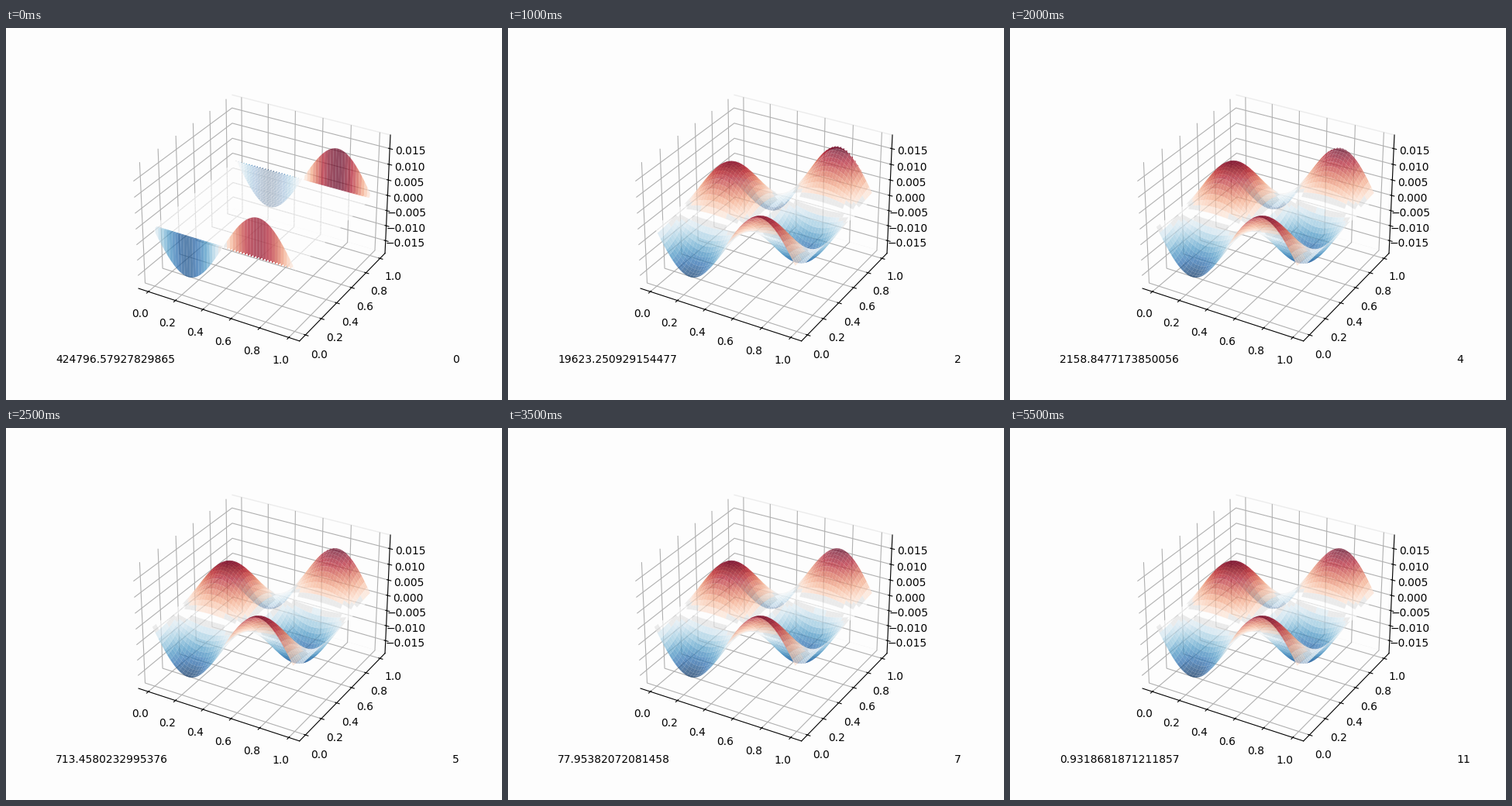
These frames come from a looping animation (640x480 px, 6000 ms). A matplotlib script:

```python
import numpy as np
import matplotlib.pyplot as plt
from matplotlib.animation import FuncAnimation
from matplotlib.colors import ListedColormap

plt.rcParams["axes3d.automargin"] = True

PAPER = "#fdfdfd"
STEPS = 12
INTERVAL = 500
AMPLITUDE = 1 / (8 * np.pi**2)
Z_LIMIT = 0.0185

axis = np.linspace(0, 1, 1025)
X, Y = np.meshgrid(axis, axis)
WAVE = -AMPLITUDE * np.sin(2 * np.pi * X)


def make_cmap():
    """Red-blue map whose middle fades into the paper colour."""
    colors = plt.get_cmap("RdBu_r")(np.linspace(0, 1, 256))
    offset = np.abs(np.linspace(-0.5, 0.5, 256))
    colors[offset < 0.065, :3] = 0.89
    colors[offset < 0.03, :3] = 0.992
    return ListedColormap(colors)


def make_residuals():
    """Residual norms: the even steps lie between their neighbours."""
    odd = [58947.62653804981, 6532.442434811244, 713.4580232995376,
           77.95382072081458, 8.521217032322587, 0.9318681871211857]
    values = [424796.57927829865]
    for now, following in zip(odd, odd[1:]):
        values += [now, float(np.sqrt(now * following))]
    return values + odd[-1:]


def solution(step):
    """Iterate of the Poisson solver; it starts from zero inside the borders."""
    if step == 0:
        z = np.zeros_like(X)
        z[[0, -1]] = WAVE[[0, -1]]
        return z
    depth = 1 - Y
    lag = 0.08 * 0.15 ** (step - 1) * np.sin(np.pi * Y) ** 2
    overshoot = 0.59 if step == 1 else 0.09 * 0.6 ** (step - 2)
    ridge = overshoot * np.exp(-depth / 0.05) * (1 - np.exp(-depth / 0.003))
    return WAVE * (np.cos(2 * np.pi * Y) * (1 - lag) + ridge)


CMAP = make_cmap()
RESIDUALS = make_residuals()

fig = plt.figure(figsize=(6.4, 4.8), dpi=100, facecolor=PAPER)
ax = fig.add_subplot(projection="3d", facecolor=PAPER)
for side, edge in ((ax.xaxis, PAPER), (ax.yaxis, "#ececec"), (ax.zaxis, PAPER)):
    side.set_pane_color(PAPER)
    side.pane.set_edgecolor(edge)

residual_text = fig.text(0.1, 0.1, "")
step_text = fig.text(0.9, 0.1, "")
surfaces = []


def draw(step):
    while surfaces:
        surfaces.pop().remove()
    surfaces.append(ax.plot_surface(X, Y, solution(step), cmap=CMAP, alpha=0.7))
    ax.set_zlim(-Z_LIMIT, Z_LIMIT)
    residual_text.set_text(repr(RESIDUALS[step]))
    step_text.set_text(str(step))
    return [*surfaces, residual_text, step_text]


anim = FuncAnimation(fig, draw, frames=STEPS, init_func=lambda: draw(0),
                     interval=INTERVAL, repeat=True, repeat_delay=0, blit=False)
plt.show()
```
